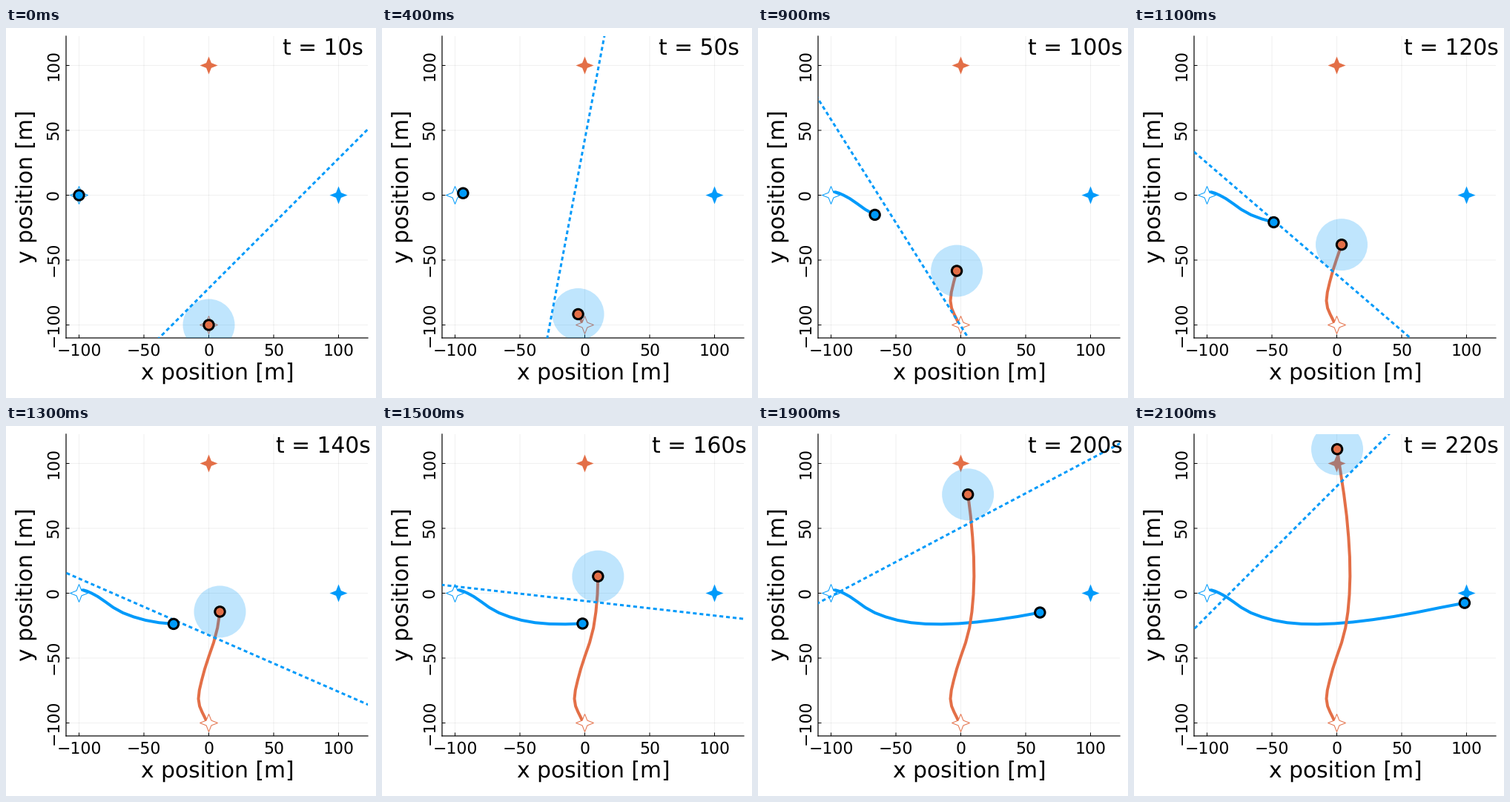
Recreate the animation shown at these times as a matplotlib script. Size 499x499 px, loop 2200 ms.

```python
import matplotlib.pyplot as plt
import numpy as np
from matplotlib.animation import FuncAnimation
from matplotlib.patches import Circle, Polygon

SIZE, DPI = 499, 64
PT = 72 / DPI                       # points per pixel
SCALE = 1.75                        # pixels per metre
LEFT, RIGHT, TOP, BOTTOM = 81, 488, 11, 418
BLUE, ORANGE = "#009AFA", "#E36F47"
FRAMES, STEP = 22, 10
RADIUS = 20

plt.rcParams.update({"font.family": "DejaVu Sans", "text.hinting": "none"})


def sway(keys, s):
    """Smooth curve through evenly spaced keys, s from 0 to 1."""
    keys = np.array(keys, float)
    slope = np.gradient(keys)
    u = s * (len(keys) - 1)
    k = np.minimum(u.astype(int), len(keys) - 2)
    f = u - k
    ease = f * f * (3 - 2 * f)
    return (keys[k] * (1 - ease) + keys[k + 1] * ease
            + slope[k] * f * (1 - f) ** 2 - slope[k + 1] * f * f * (1 - f))


# each vehicle speeds up along its axis and swerves sideways
s = np.linspace(0, 1, FRAMES)
blue_path = np.column_stack([
    -100 + 198.5 * s ** 2.09,
    sway([0, 2.4, -2.6, -15.1, -22.7, -23.4, -18, -7.5], s)])
orange_path = np.column_stack([
    sway([0, -3.3, -8, -3.1, 6.7, 10.2, 7.6, 0.3], s),
    -100 + 211 * s ** 2 * (1.085 - 0.085 * s ** 2.6)])

fig = plt.figure(figsize=(SIZE / DPI, SIZE / DPI), dpi=DPI, facecolor="white")
ax = fig.add_axes([LEFT / SIZE, 1 - BOTTOM / SIZE,
                   (RIGHT - LEFT) / SIZE, (BOTTOM - TOP) / SIZE])
span = (-110, -110 + (RIGHT - LEFT) / SCALE)
ax.set(xlim=span, ylim=span, xticks=[], yticks=[])
ax.spines[["top", "right"]].set_visible(False)
for side in ("left", "bottom"):
    ax.spines[side].set(linewidth=1.2 * PT, snap=False)


def label(x, y, text, size, **kw):
    return fig.text(x / SIZE, 1 - y / SIZE, text, fontsize=size * PT,
                    ha="center", va="baseline", **kw)


def label_up(x, y, text, size):
    label(x, y, text, size, rotation=90, rotation_mode="anchor")


def rule(x, y, z, **kw):
    ax.plot(x, y, color="black", snap=False, solid_capstyle="butt",
            zorder=z, **kw)


for v in range(-100, 101, 50):
    rule([v, v], span, 1, alpha=0.06, lw=PT)
    rule(span, [v, v], 1, alpha=0.06, lw=PT)
    tick = [span[0], span[0] + 4.5 / SCALE]
    rule([v, v], tick, 2, lw=PT)
    rule(tick, [v, v], 2, lw=PT)
    name = str(v).replace("-", "\u2212")
    label(273.5 + v * SCALE, 442, name, 22)
    label_up(70, 224.6 - v * SCALE, name, 22)
label(285, 475, "x position [m]", 29.7)
label_up(37, 213.6, "y position [m]", 29.7)
clock = label(427.4, 36, "", 29.7)


def star(x, y, face, edge, z=4):
    a = np.arange(8) * np.pi / 4
    r = np.where(np.arange(8) % 2, 0.4, 1) * 12 / SCALE
    pts = np.column_stack([x + r * np.cos(a), y + r * np.sin(a)])
    ax.add_patch(Polygon(pts, facecolor=face, edgecolor=edge, linewidth=PT,
                         joinstyle="miter", zorder=z))


def ball(color):
    return ax.add_patch(Circle((0, 0), 6.7 / SCALE, facecolor=color,
                               edgecolor="black", linewidth=3 * PT, zorder=8))


def trail(color):
    return ax.plot([], [], color=color, lw=4 * PT, zorder=3,
                   solid_capstyle="butt", solid_joinstyle="round")[0]


movers = [(path, trail(color), ball(color))
          for path, color in ((blue_path, BLUE), (orange_path, ORANGE))]
star(-100, 0, "white", BLUE)
star(0, -100, "white", ORANGE)
star(100, 0, BLUE, "none")
star(0, 100, ORANGE, "none")
disk = ax.add_patch(Circle((0, 0), RADIUS, facecolor=BLUE, alpha=0.25,
                           linewidth=0, zorder=5))
tangent, = ax.plot([], [], color=BLUE, lw=3 * PT, zorder=6,
                   linestyle=(0, (1.7, 1.3)), dash_capstyle="butt")


def draw(i):
    for path, line, dot in movers:
        line.set_data(*path[:i + 1].T)
        dot.center = path[i]
    c = orange_path[i]
    disk.center = c
    # the tangent makes half a turn around the disk
    a = np.radians(135 + 180 * s[i])
    n, d = np.array([np.cos(a), np.sin(a)]), np.array([-np.sin(a), np.cos(a)])
    tangent.set_data(*(c + RADIUS * n + np.outer([-350, 350], d)).T)
    clock.set_text(f"t = {STEP * (i + 1)}s")
    return []


anim = FuncAnimation(fig, draw, frames=FRAMES, interval=100, repeat=True,
                     repeat_delay=0, init_func=lambda: draw(0))
plt.show()
```
